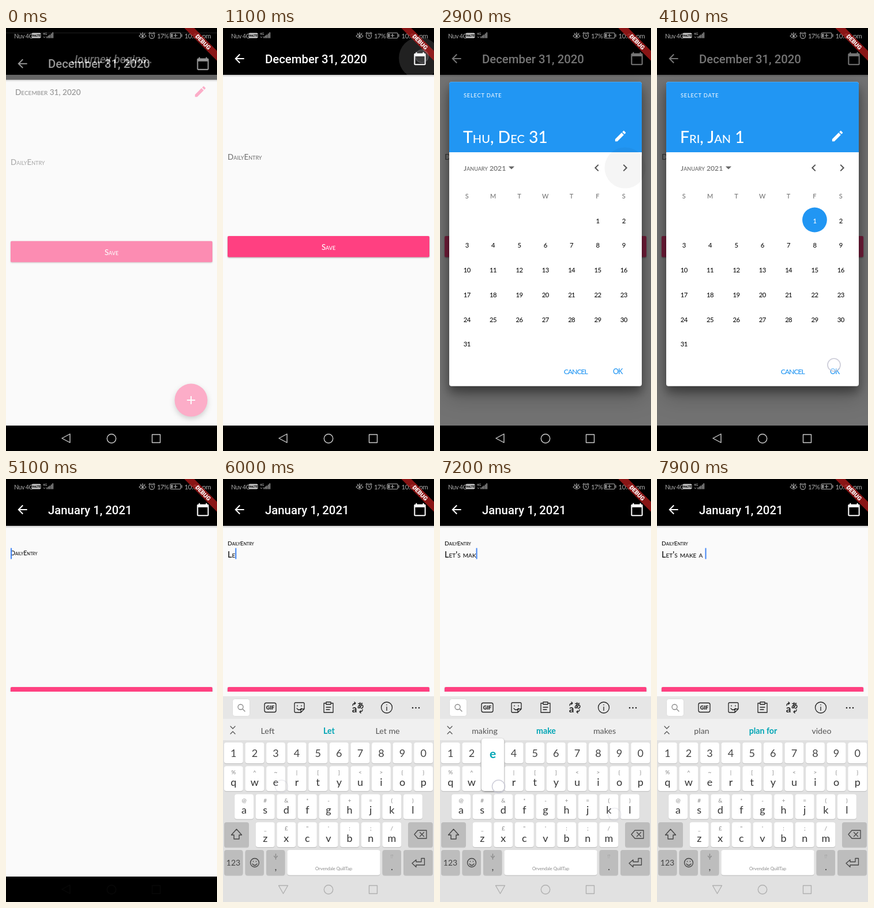
An HTML page that plays this animation: 366x732 px, repeating every 8 s.

```html
<!DOCTYPE html>
<html lang="en">
<head>
<meta charset="utf-8">
<title>Diary entry</title>
<style>
html, body { margin: 0; height: 100%; overflow: hidden; background: #000; }
svg { display: block; width: 100vw; height: 100vh; }
text { font-family: Lato, sans-serif; white-space: pre; }
.sc { font-variant-caps: small-caps; font-weight: 500; }
.bar { font: 500 20.33px Roboto, sans-serif; }
.mid { text-anchor: middle; }
.line { fill: none; stroke-linecap: round; stroke-linejoin: round; }
.caps { text-transform: uppercase; }
#months, #actions { font-weight: 500; }
#save { filter: drop-shadow(0 1.5px 1px #0005); }
#card { filter: drop-shadow(0 10px 8px #0005) drop-shadow(0 14px 16px #0004); }
#fab { filter: drop-shadow(0 4px 4px #0006); }
#popup rect { filter: drop-shadow(0 1px 1.5px #0006); }
</style>
</head>
<body>
<svg id="stage" viewBox="0 0 366 732"></svg>
<script>
const PINK = '#ff4081', BLUE = '#2196f3', PAPER = '#fafafa', TEAL = '#00a5b5';
const ICON = {
  back: 'M20 11H7.83l5.59-5.59L12 4l-8 8 8 8 1.41-1.41L7.83 13H20z',
  calendar: 'M20 3h-1V1h-2v2H7V1H5v2H4c-1.1 0-2 .9-2 2v16c0 1.1.9 2 2 2h16c1.1 0 2-.9 2-2V5c0-1.1-.9-2-2-2zm0 18H4V8h16z',
  edit: 'M3 17.25V21h3.75L17.81 9.94l-3.75-3.75zM20.71 7.04c.39-.39.39-1.02 0-1.41l-2.34-2.34c-.39-.39-1.02-.39-1.41 0l-1.83 1.83 3.75 3.75z',
  left: 'M15.41 7.41L14 6l-6 6 6 6 1.41-1.41L10.83 12z',
  right: 'M10 6L8.59 7.41 13.17 12l-4.58 4.59L10 18l6-6z',
  drop: 'M7 10l5 5 5-5z',
  plus: 'M19 13h-6v6h-2v-6H5v-2h6V5h2v6h6z'
};
const icon = (name, x, y, fill, attrs = '') =>
  `<path d="${ICON[name]}" fill="${fill}" transform="translate(${x} ${y}) scale(1.017) translate(-12 -12)" ${attrs}/>`;
const rect = (x, y, w, h, fill, attrs = '') =>
  `<rect x="${x}" y="${y}" width="${w}" height="${h}" fill="${fill}" ${attrs}/>`;
const text = (x, y, s, size, fill, attrs = '') =>
  `<text x="${x}" y="${y}" font-size="${size}" fill="${fill}" ${attrs}>${s}</text>`;
const line = (d, stroke, width = 1.3, attrs = '') =>
  `<path class="line" d="${d}" stroke="${stroke}" stroke-width="${width}" ${attrs}/>`;
const disc = (x, y, r, fill, attrs = '') => `<circle cx="${x}" cy="${y}" r="${r}" fill="${fill}" ${attrs}/>`;
const ring = (x, y, r) => `M${x - r} ${y}a${r} ${r} 0 1 0 ${2 * r} 0a${r} ${r} 0 1 0 ${-2 * r} 0`;
const esc = s => s.replace(/&/g, '&amp;').replace(/</g, '&lt;');
const each = (list, f) => [...list].map(f).join('');

// Pages
const home = rect(0, 0, 366, 688, PAPER) + rect(0, 0, 366, 81, '#000')
  + text(184, 61, 'Journey begins..', 20, '#fff', 'class="bar mid" style="font-size:19.6px;font-style:italic"')
  + text(16, 116, 'December 31, 2020', 13.6, '#000', 'class="sc"')
  + icon('edit', 337, 110, PINK)
  + disc(321, 644, 28.5, PINK, 'id="fab"') + icon('plus', 321, 644, '#fff');

const page = rect(0, 0, 366, 688, PAPER)
  + rect(0, 81, 366, 4, 'url(#shade)') + rect(0, 0, 366, 81, '#000')
  + disc(341, 52, 0, '#fff', 'id="barRipple" clip-path="url(#barClip)"')
  + icon('back', 28.5, 53, '#fff') + text(73, 60.5, '', 20, '#fff', 'id="title" class="bar"')
  + icon('calendar', 341.5, 53, '#fff')
  + `<g id="label">${text(0, 0, 'DailyEntry', 13.5, 'inherit', 'class="sc" style="fill:inherit"')}</g>`
  + text(8, 135.5, '', 14.5, '#111', 'id="typed" class="sc" style="word-spacing:.5px"')
  + rect(8, 119.5, 2, 19, '#4285f4', 'id="caret"')
  + `<g id="save">${rect(8, 360, 350, 36.5, PINK, 'rx="2"')}</g>`
  + text(183, 384, 'Save', 13.3, '#fff', 'class="sc mid"')
  + rect(0, 368, 366, 320, PAPER, 'id="cover"');

// Date picker
const colX = c => 46.7 + 45.35 * c, rowY = r => 333 + 42.75 * r;
function month(first, x, selected) {
  let out = each('SMTWTFS', (d, i) => text(colX(i), 294.5, d, 11, '#777', 'class="mid"'));
  for (let d = 1; d <= 31; d++) {
    const n = d - 1 + first, cx = colX(n % 7), cy = rowY(Math.floor(n / 7));
    const on = d === selected;
    if (on) out += disc(cx, cy - 1, 21.4, BLUE, 'class="pick"');
    out += text(cx, cy + 4.5, d, 11.3, '#111', `class="mid${on ? ' pickText' : ''}" letter-spacing="-.6"`);
  }
  return `<g transform="translate(${x})">${out}</g>`;
}
const dialog = rect(0, 0, 366, 688, '#000', 'opacity=".54"')
  + `<g id="card">${rect(16, 93.3, 334, 526.5, '#fff', 'rx="4"')}</g>`
  + `<path d="M16 215V97.3a4 4 0 0 1 4-4h326a4 4 0 0 1 4 4V215z" fill="${BLUE}"/>`
  + text(41, 120, 'SELECT DATE', 9.3, '#fff', 'letter-spacing=".8"')
  + text(40, 198.5, '', 28.4, '#fff', 'id="chosen" class="sc"') + icon('edit', 313, 187, '#fff')
  + text(41, 247, '', 12.2, '#666', 'id="month" class="sc"') + icon('drop', 0, 241.5, '#666', 'id="drop"')
  + disc(321, 242, 0, '#000', 'id="nextRipple"')
  + icon('left', 272, 242, '#555') + icon('right', 321, 242, '#555')
  + `<g clip-path="url(#gridClip)"><g id="months">${month(2, 0, 31)}${month(5, 334, 1)}</g></g>`
  + '<g id="actions">' + text(235.3, 599, 'CANCEL', 12.2, BLUE, 'class="mid" letter-spacing="-1"')
  + text(308.3, 599, 'OK', 12.5, BLUE, 'class="mid" letter-spacing="-1"') + '</g>';

// Keyboard
const keys = {};
const cap = (x, y, w, h, fill = '#fff') =>
  rect(x, y + 1.2, w, h, '#c4c4c4', 'rx="4"') + rect(x, y, w, h, fill, 'rx="4"');
const row = (letters, hints, x0, y) => each(letters, (s, i) => {
  const x = x0 + 36.6 * i;
  keys[s] = [x, y];
  return cap(x - 16.4, y, 32.8, 43) + text(x, y + 14, esc(hints[i]), 10, '#888', 'class="mid"')
    + text(x, y + 33.5, s, 18, '#333', 'class="mid"');
});
const dark = '#222';
const toolbar = rect(16.5, 380.5, 30, 30, '#fff', 'rx="4" stroke="#ddd"')
  + line(ring(30.5, 394.5, 4.5) + 'M34 398l4 4', '#888')
  + line('M75 387.5h14q3 0 3 3v10q0 3-3 3h-14q-3 0-3-3v-10q0-3 3-3', dark)
  + text(82, 399, 'GIF', 9, dark, 'class="mid" font-weight="900"')
  + line('M126 387h13q2 0 2 2v9l-6 6h-9q-2 0-2-2v-13q0-2 2-2M141 398h-4q-2 0-2 2v4M128 397q4 5 8 0M129 392v1M136 392v1', dark)
  + line('M179 388h-4v16h16v-16h-4M179 386h8v4h-8zM179 395h8M179 399h6', dark)
  + text(228, 404, 'a', 17, dark, 'class="mid" font-weight="700"')
  + text(238.5, 396.5, 'あ', 12, dark, 'class="mid" font-weight="700" style="font-family:\'Noto Sans CJK JP\',\'Noto Sans CJK\',sans-serif"')
  + line('M225 392q0-4 5-4l-2-2m2 2l-2 2M242 399q0 4-5 4l2-2m-2 2l2 2', dark)
  + line(ring(284, 395.5, 9.5) + 'M284 394.5v6M284 390.5v.4', dark)
  + each([329, 334.5, 340], x => disc(x, 396, 1.3, dark));
const collapse = line('M13 428l4 4 4-4M13 441l4-4 4 4', '#555');
const words = each([77.5, 184, 285.5], (x, i) =>
  text(x, 440.5, '', 14.2, i === 1 ? TEAL : '#555', `class="mid word" ${i === 1 ? 'font-weight="700"' : ''}`));
const GREY = '#bdbdbd';
const keyboard = rect(0, 376, 366, 39, '#e6e6e6') + rect(0, 415, 366, 37, '#f0f0f0')
  + rect(0, 452, 366, 280, '#e1e1e1') + toolbar + collapse + words
  + each('1234567890', (s, i) => cap(1.9 + 36.6 * i, 456, 32.8, 36)
    + text(18.3 + 36.6 * i, 480.5, s, 18, '#444', 'class="mid"'))
  + '<g id="letters">' + row('qwertyuiop', '%^~|[]<>{}', 18.3, 497)
  + row('asdfghjkl', '@#&*-+=()', 36.6, 545.5) + row('zxcvbnm', '_£"\':;/', 73.2, 594) + '</g>'
  + cap(2, 594, 43, 43, GREY) + line('M23.5 606l-9 10h4.5v7h9v-7h4.5z', '#444', 1.4, 'id="shift"')
  + cap(321, 594, 43, 43, GREY) + line('M338 608h15v14h-15l-6-7zM341.5 611.5l7 7m0-7l-7 7', '#444')
  + cap(2, 642, 32.5, 43.5, GREY) + text(18, 669, '123', 14, '#444', 'class="mid"')
  + cap(38.5, 642, 32.5, 43.5, GREY) + line(ring(55, 664, 7.5) + 'M51 666q4 5 8 0M52.5 661.5v.5M57.5 661.5v.5', '#444')
  + cap(75, 642, 32.5, 43.5, GREY) + line('M91.5 649v4M88.5 652.5q3 5 6 0M91.5 655v3', '#888', 1.4)
  + text(91.5, 677, ',', 17, '#444', 'class="mid"')
  + cap(111.5, 642, 161, 43.5) + text(192, 676.5, 'Orvendale QuillTap', 7.6, '#888', 'class="mid"')
  + cap(276.5, 642, 32.5, 43.5, GREY) + text(293, 656, '!?', 7, '#999', 'class="mid"')
  + text(293, 677, '.', 17, '#444', 'class="mid"')
  + cap(313, 642, 51, 43.5, GREY) + line('M328 665l7-6v3.5h9v-6h5.5v11.5h-14.5v3.5z', '#444')
  + `<g id="popup">${rect(-19.7, -48, 39.4, 91, '#fff', 'rx="5"')}${text(0, -14, '', 21, TEAL, 'class="mid" font-weight="700"')}</g>`;

// System bars
const S = '#a8a8a8';
const system = text(14, 17.5, 'Nuv 4G', 10.6, S, 'letter-spacing="-.5"')
  + rect(44.5, 8.5, 16, 9, '#c4c4c4', 'rx="2"')
  + text(52.5, 15.3, 'VoLTE', 5.6, '#000', 'class="mid" font-weight="900"')
  + text(64, 11.5, '4G', 5.5, S, 'font-weight="700"')
  + line('M65 15l1.5 2 1.5-2', S, .8)
  + each([3, 4.5, 6, 8, 10], (h, i) => rect(70.5 + 2.5 * i, 17.5 - h, 1.5, h, S))
  + line('M231 14q6-7 12 0q-6 7-12 0M233 9l1 1.5M237 7.5v2M241 9l-1 1.5', S, 1.1) + disc(237, 14, 2, S)
  + line(ring(253, 13.5, 4.6) + 'M253 11v3h2M248 9.5l2-2M258 9.5l-2-2', S, 1.1)
  + text(262, 17.5, '17%', 11.3, S, 'letter-spacing="-.7"')
  + line('M286.5 8.5h15q1.5 0 1.5 1.5v6q0 1.5-1.5 1.5h-15q-1.5 0-1.5-1.5v-6q0-1.5 1.5-1.5M305 11v4M291 13h6', S, 1.2)
  + rect(286.5, 10, 2.5, 6, S) + line('M294 10.5v5', S, 1.4)
  + text(309.5, 17.5, '10:36 pm', 11.5, S, 'letter-spacing="-.3"')
  + '<g transform="translate(342 24) rotate(45)">' + rect(-60, -6, 120, 12.2, '#b71c1c', 'opacity=".75"')
  + text(0, 3.8, 'DEBUG', 10.2, '#fff', 'class="mid" style="font-family:Roboto,sans-serif;font-weight:900"') + '</g>';
const BACK = 'M97 710l14-7.5v15z', HIDE = 'M96.5 703.5h16l-8 14z';
const nav = rect(0, 688, 366, 44, '#000', 'id="navBar"')
  + '<g id="navIcons">' + line(BACK, 'inherit', 1.4, 'id="backKey" style="stroke:inherit"')
  + line('M253.5 703.5h14v14h-14z' + ring(183, 710.5, 7.7), 'inherit', 1.4, 'style="stroke:inherit"') + '</g>';

document.getElementById('stage').innerHTML = `<defs>
  <linearGradient id="shade" x2="0" y2="1"><stop stop-opacity=".2"/><stop offset="1" stop-opacity="0"/></linearGradient>
  <clipPath id="barClip"><path d="M0 0h366v81H0z"/></clipPath>
  <clipPath id="gridClip"><path d="M16 270h334v300H16z"/></clipPath></defs>
  ${home}<g id="page">${page}</g><g id="dialog">${dialog}</g><g id="keyboard">${keyboard}</g>
  ${nav}${system}<g id="touches"></g>`;

const $ = id => document.getElementById(id);
const set = (id, attrs) => { for (const k in attrs) $(id).setAttribute(k, attrs[k]); };
const ramp = (t, a, b) => Math.min(1, Math.max(0, (t - a) / (b - a)));
const ease = p => p * p * (3 - 2 * p);

// Key presses; each one lands in the text 100 ms later
const presses = [[5700, 'L'], [5900, 'e'], [6100, 't'], [6400, 's'], [6600, ' '], [6700, 'm'],
  [6900, 'a'], [7100, 'k'], [7200, 'e'], [7400, ' '], [7500, 'a'], [7700, ' ']];
const touches = [[900, 345, 49], [1000, 345, 49], [2400, 322, 243], [2500, 322, 243], [3300, 275, 334],
  [3400, 275, 334], [4000, 307, 583], [4100, 307, 583], [4800, 160, 215], [4900, 160, 215],
  ...presses.map(([t, s]) => {
    if (s === ' ') return [t, 230, 665];
    const [x, y] = keys[s.toLowerCase()];
    return [t, x + 10, y + 35];
  })];
// Suggestions by typed length
const suggestions = [[13, 'plan,plan for,video'], [12, 'an,a,as'], [11, 'sure,a,it'], [8, 'making,make,makes'],
  [7, 'me,make,my'], [6, 'hope,see,go'], [4, 'Lets,Let\'s,Let'], [2, 'Left,Let,Let me'], [1, 'Lol,Love,Let'], [0, 'I,The,Hi']];

function draw(t) {
  const entering = t < 100;
  set('page', { opacity: entering ? .59 : 1, transform: `translate(0 ${entering ? 8.7 : 0})` });
  $('title').textContent = t < 4200 ? 'December 31, 2020' : 'January 1, 2021';
  set('barRipple', { r: 36 * Math.sqrt(ramp(t, 700, 1100)), opacity: .13 * (1 - ramp(t, 1300, 1600)) });

  const shown = ramp(t, 1300, 1600) * (1 - ramp(t, 4100, 4400));
  const picked = t >= 3500, next = t >= 2700;
  set('dialog', { opacity: shown });
  $('chosen').textContent = picked ? 'Fri, Jan 1' : 'Thu, Dec 31';
  $('month').textContent = next ? 'January 2021' : 'December 2020';
  set('drop', { transform: `translate(${next ? 124 : 131} 241.5) scale(1.017) translate(-12 -12)` });
  set('months', { transform: `translate(${-334 * ease(ramp(t, 2500, 2900))})` });
  set('nextRipple', { r: 35.6 * ramp(t, 2300, 2600), opacity: .1 * (1 - ramp(t, 2600, 3100)) });
  document.querySelectorAll('.pick').forEach((el, i) => el.setAttribute('opacity', +(picked === !!i)));
  document.querySelectorAll('.pickText').forEach((el, i) => el.setAttribute('fill', picked === !!i ? '#fff' : '#111'));

  const focus = ramp(t, 4930, 5130);
  set('label', { transform: `translate(8 ${228 - 113 * focus}) scale(${1 - .25 * focus})`, fill: focus ? '#111' : '#777' });
  set('cover', { opacity: +(t >= 5100) });

  const typed = presses.filter(p => p[0] < t).map(p => p[1]).join('').replace('Lets ', "Let's ");
  $('typed').textContent = typed;
  set('caret', { x: 8 + (typed ? $('typed').getComputedTextLength() : 0), opacity: +(focus > 0) });

  const rise = 1 - (1 - ramp(t, 5100, 5500)) ** 2, light = t >= 5200;
  set('keyboard', { transform: `translate(0 ${360 * (1 - rise)})`, opacity: +light });
  $('letters').classList.toggle('caps', !typed);
  set('shift', { fill: typed ? 'none' : '#444' });
  const offer = suggestions.find(s => typed.length >= s[0])[1].split(',');
  document.querySelectorAll('.word').forEach((el, i) => el.textContent = offer[i]);
  set('navBar', { fill: light ? '#e1e1e1' : '#000' });
  set('backKey', { d: light ? HIDE : BACK });
  set('navIcons', { stroke: light ? '#b0b0b0' : '#ccc', opacity: light ? 1 : 1 - .96 * ramp(t, 4900, 5100) });

  const press = presses.find(p => p[0] === t && p[1] !== ' ');
  set('popup', { opacity: press ? 1 : 0 });
  if (press) {
    const [x, y] = keys[press[1].toLowerCase()];
    set('popup', { transform: `translate(${x} ${y})` });
    $('popup').lastChild.textContent = press[1];
  }
  $('touches').innerHTML = each(touches.filter(p => t - p[0] >= 0 && t - p[0] <= 100), ([t0, x, y]) =>
    disc(x, y, 11, '#fff', `fill-opacity=".4" stroke="#c4c4d2" stroke-width="1.6" opacity="${t === t0 ? .8 : .3}"`));
}

let start;
function tick(now) {
  start ??= now;
  draw(Math.floor((now - start) % 8000 / 100) * 100);
  requestAnimationFrame(tick);
}
draw(0);
requestAnimationFrame(tick);
</script>
</body>
</html>
```
